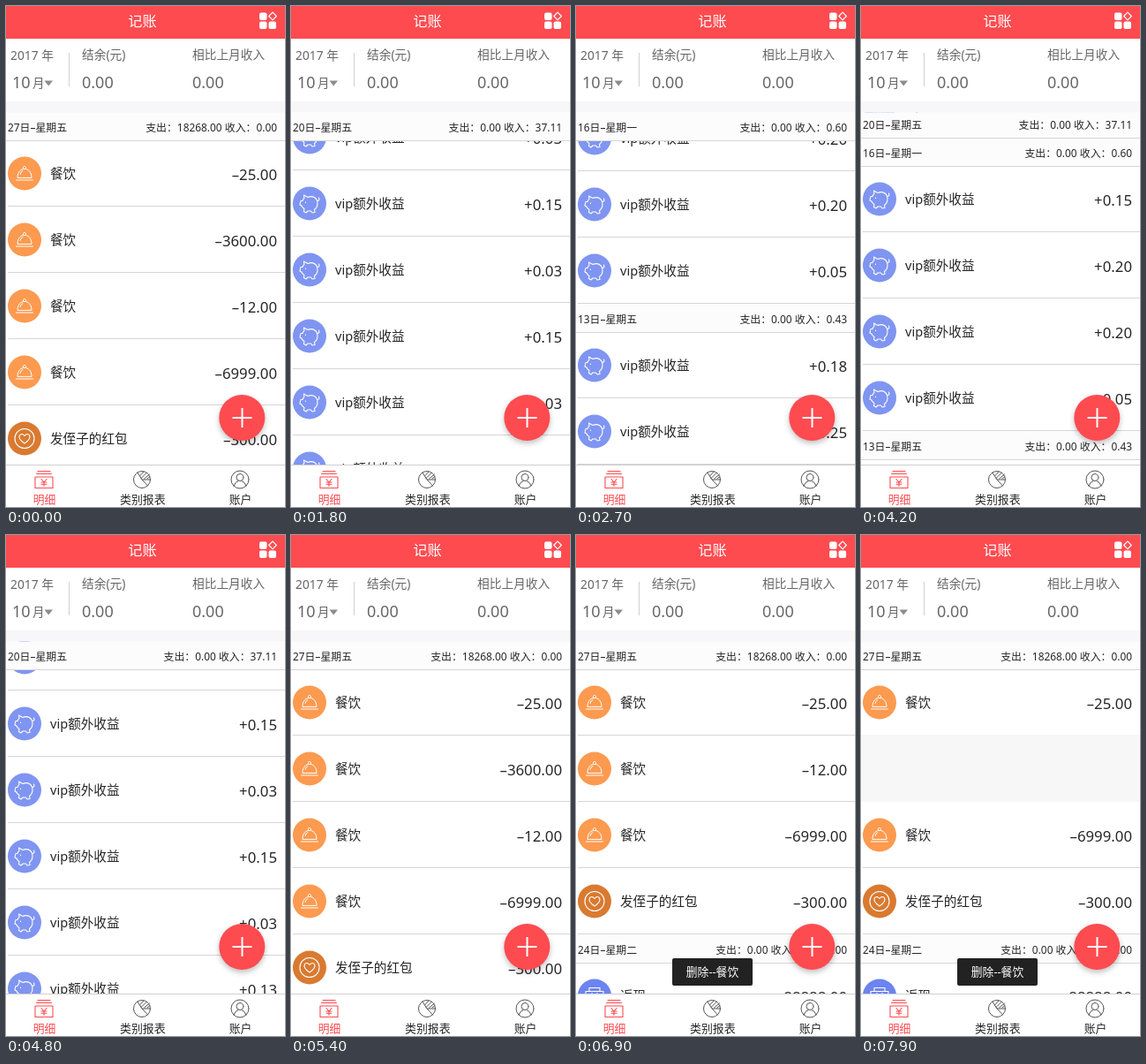
An HTML page with a canvas that plays this animation: 316x567 px, repeating every 8000 ms.

```html
<!DOCTYPE html>
<html lang="zh">
<head>
<meta charset="utf-8">
<style>
html, body { margin: 0; width: 100%; height: 100%; overflow: hidden; background: #fff; }
canvas { display: block; width: 316px; height: 567px; }
</style>
</head>
<body>
<canvas id="stage"></canvas>
<script>
const W = 316, H = 567, LOOP = 8000, STEP = 100;
const LIST_TOP = 120.5, LIST_END = 519, HEAD = 32, ROW = 75;
const RED = '#fe4b50', INK = '#262626', GREY = '#666', LINE = '#d6d6d6', GAP = '#f7f7f7';
const FONT = '"Noto Sans", "Noto Sans CJK SC", sans-serif';

const canvas = document.getElementById('stage');
const c = canvas.getContext('2d');
const dpr = window.devicePixelRatio || 1;
canvas.width = W * dpr;
canvas.height = H * dpr;

const meal = amount => ({ icon: cloche, color: '#fc9a50', label: '餐饮', amount });
const bonus = amount => ({ icon: pig, color: '#7f95f1', label: 'vip额外收益', amount });
const sections = [
  { date: '27日–星期五', out: '18268.00', income: '0.00', rows: [
    meal('–25.00'), meal('–3600.00'), meal('–12.00'), meal('–6999.00'),
    { icon: heart, color: '#d97a30', label: '发侄子的红包', amount: '–300.00' }] },
  { date: '24日–星期二', out: '0.00', income: '88888.00', rows: [
    { icon: cashback, color: '#6c84f0', label: '返现', amount: '+88888.00' }] },
  { date: '20日–星期五', out: '0.00', income: '37.11', rows:
    ['+36.26', '+0.03', '+0.15', '+0.03', '+0.15', '+0.03', '+0.13', '+0.15', '+0.03', '+0.15'].map(bonus) },
  { date: '16日–星期一', out: '0.00', income: '0.60', rows:
    ['+0.15', '+0.20', '+0.20', '+0.05'].map(bonus) },
  { date: '13日–星期五', out: '0.00', income: '0.43', rows: ['+0.18', '+0.25'].map(bonus) }
];

// Motion tracks: [time, value] pairs, linear between neighbours.
const scrollKeys = [[1600, 0], [1700, 270], [1800, 630], [1900, 815], [2000, 975], [2100, 1111],
  [2200, 1226], [2300, 1320], [2400, 1385], [2500, 1411], [4100, 1411], [4200, 1267], [4300, 1130],
  [4400, 1130], [4500, 930], [4700, 930], [4800, 640], [4900, 390], [5000, 200], [5100, 65], [5200, 0]];
sections[0].rows[1].swipe = [[5600, 0], [5700, 25], [5800, 75], [5900, 150], [6000, 225],
  [6100, 280], [6300, 280], [6400, W]];
sections[0].rows[1].collapse = [6500, 6900];
sections[0].rows[2].swipe = [[7200, 0], [7300, 70], [7400, 170], [7500, 270], [7800, 270], [7900, W]];

function track(keys, t) {
  if (t <= keys[0][0]) return keys[0][1];
  for (let i = 1; i < keys.length; i++) {
    const [t0, v0] = keys[i - 1], [t1, v1] = keys[i];
    if (t <= t1) return v0 + (v1 - v0) * (t - t0) / (t1 - t0);
  }
  return keys[keys.length - 1][1];
}

function rowHeight(row, t) {
  if (!row.collapse) return ROW;
  const [a, b] = row.collapse;
  const p = Math.min(1, Math.max(0, (t - a) / (b - a)));
  return ROW * (1 - p * p * (3 - 2 * p));
}

function box(x, y, w, h, color) {
  c.fillStyle = color;
  c.fillRect(x, y, w, h);
}

function roundBox(x, y, w, h, r, color) {
  c.fillStyle = color;
  c.beginPath();
  c.roundRect(x, y, w, h, r);
  c.fill();
}

function disc(x, y, r, color) {
  c.fillStyle = color;
  c.beginPath();
  c.arc(x, y, r, 0, Math.PI * 2);
  c.fill();
}

function text(str, x, y, size, color, align = 'left') {
  c.font = `${size}px ${FONT}`;
  c.fillStyle = color;
  c.textAlign = align;
  c.fillText(str, x, y + size * 0.36);
}

function stroke(path, x, y, color, width = 1) {
  c.save();
  c.translate(x, y);
  c.strokeStyle = color;
  c.lineWidth = width;
  c.lineCap = c.lineJoin = 'round';
  c.stroke(new Path2D(path));
  c.restore();
}

function cloche(x, y) {
  stroke('M-8 4.5C-8 -8.5 8 -8.5 8 4.5ZM-9.5 7.5H9.5M-1.5 -6a1.6 1.6 0 1 1 3 0M-5 1Q-4.5 -2 -2 -3', x, y, '#fff', 1);
}

function heart(x, y) {
  stroke('M11 0a11 11 0 1 1 -22 0a11 11 0 1 1 22 0M0 5.5C-11 -1.5 -4 -8.5 0 -3C4 -8.5 11 -1.5 0 5.5Z', x, y, '#fff', 1.1);
}

function pig(x, y) {
  stroke('M-6.5 -9.5L-2 -7C4 -9.5 9 -6 9 0C9 3.5 7.5 5.5 5.5 7L6 10L3 10.5L1.5 8.5H-2L-4 10.5L-6.5 9L-6 6Q-8.5 4.5 -9 2.5L-11 1.5L-10 -3L-8 -3Q-7.5 -5 -6 -6ZM8.5 -3Q12 -3 10.5 -6.5M-4.5 -1.5V-1', x, y, '#fff', 1.1);
}

function cashback(x, y) {
  stroke('M-10 -5H10V9H-10ZM-6 -5V-9H6V-5M-3 -3L0 1L3 -3M0 1V6M-3 1H3M-3 3.5H3', x, y, '#fff', 1.1);
}

function drawRow(row, y) {
  const mid = y + ROW / 2 - 0.5;
  box(0, y, W, ROW, '#fff');
  box(2, Math.floor(y + ROW - 1), W, 1, LINE);
  disc(21, mid, 19, row.color);
  row.icon(21, mid);
  text(row.label, 50, mid + 0.5, 14.6, INK);
  text(row.amount, 307, mid + 1, 16.8, INK, 'right');
}

function drawSwiped(row, y, h, shift) {
  const top = Math.floor(y - 1);
  box(0, top, W, y + h - top, GAP);
  if (shift >= W) return;
  c.save();
  c.translate(-shift, 0);
  drawRow(row, y);
  box(2, top, W, 1, LINE);
  c.restore();
}

function drawHead(s, y) {
  box(0, y, W, HEAD, '#fcfcfc');
  box(0, Math.ceil(y + HEAD - 1), W, 1, LINE);
  text(s.date, 2, y + 17, 11.9, INK);
  text(`支出：${s.out} 收入：${s.income}`, 307, y + 17, 11.9, INK, 'right');
}

function drawGlow(y, height) {
  if (height <= 0) return;
  c.fillStyle = 'rgba(90,90,90,.06)';
  c.beginPath();
  c.ellipse(W / 2, y, W * 0.6, height, 0, 0, Math.PI * 2);
  c.fill();
}

function drawList(t) {
  c.save();
  c.beginPath();
  c.rect(0, LIST_TOP, W, LIST_END - LIST_TOP);
  c.clip();
  let y = LIST_TOP - track(scrollKeys, t);
  const heads = [];
  for (const s of sections) {
    heads.push(y);
    const rowsTop = y + HEAD;
    y = rowsTop;
    for (const row of s.rows) {
      const h = rowHeight(row, t);
      const shift = row.swipe ? track(row.swipe, t) : 0;
      if (h > 0 && y < LIST_END && y + h > LIST_TOP) {
        if (shift > 0) drawSwiped(row, y, h, shift);
        else drawRow(row, y);
      }
      y += h;
    }
    drawHead(s, rowsTop - HEAD);
  }
  // The current day stays pinned until the next one pushes it out.
  const current = heads.filter(v => v <= LIST_TOP).length - 1;
  const next = current + 1 < heads.length ? heads[current + 1] : Infinity;
  drawHead(sections[current], Math.min(LIST_TOP, next - HEAD));
  drawGlow(LIST_END, track([[2400, 0], [2500, 40], [2700, 0]], t));
  drawGlow(LIST_TOP, track([[5100, 0], [5200, 16], [5400, 0]], t));
  c.restore();
}

function drawTop() {
  box(0, 0, W, 37, RED);
  text('记账', 154.5, 17, 16.2, '#fff', 'center');
  for (const [x, y] of [[287, 7.5], [287, 17.5], [297.5, 17.5]]) roundBox(x, y, 8.5, 8.5, 2, '#fff');
  stroke('M0 -4.3L4.3 0L0 4.3L-4.3 0Z', 302, 11.5, '#fff', 1.2);

  box(0, 37, W, 71, '#fff');
  box(0, 108, W, 13, '#f7f6f9');
  text('2017 年', 5, 56, 13.8, GREY);
  text('10', 7, 87, 18, GREY);
  text('月', 30, 87.5, 13.5, GREY);
  c.fillStyle = '#8c8c8c';
  c.fill(new Path2D('M43.5 84.5H53L48.2 90.5Z'));
  box(71, 53, 1, 38, '#d0d0d0');
  text('结余(元)', 86, 55.5, 13.7, GREY);
  text('相比上月收入', 211, 55.5, 13.7, GREY);
  text('0.00', 86, 87, 18, GREY);
  text('0.00', 211, 87, 18, GREY);
}

function drawTabs() {
  box(0, LIST_END, W, H - LIST_END, '#fff');
  box(0, LIST_END, W, 1, '#cfcfcf');
  stroke('M-7 -9.5H7M-8.5 -6.5H8.5M-10 -3H10V9.5H-10ZM-3 -.5L0 3L3 -.5M0 3V7.5M-3 3H3M-3 5.2H3', 43, 536, RED, 1.1);
  stroke('M9.5 0a9.5 9.5 0 1 1 -19 0a9.5 9.5 0 1 1 19 0M-5 -8L0 0H9.5M0 0L6.5 7M-2.5 -4L2 -9M-1 -1.5L5.5 -8M2.5 -1L8.5 -6M6 -1L9 -3.5', 154, 536, '#555', 1);
  stroke('M10 0a10 10 0 1 1 -20 0a10 10 0 1 1 20 0M4 -2.5a4 4 0 1 1 -8 0a4 4 0 1 1 8 0M-7 7Q-5.5 2.5 -2 1.5M7 7Q5.5 2.5 2 1.5', 265, 536, '#555', 1);
  text('明细', 43.5, 558, 12.8, RED, 'center');
  text('类别报表', 154.8, 558, 12.9, INK, 'center');
  text('账户', 265.5, 558, 12.8, INK, 'center');
}

function drawAddButton() {
  c.save();
  c.shadowColor = 'rgba(0,0,0,.25)';
  c.shadowBlur = 6 * dpr;
  c.shadowOffsetY = 3 * dpr;
  disc(267.3, 466, 26, RED);
  c.restore();
  box(256.5, 465, 22, 2, '#fff');
  box(266.5, 455, 2, 22, '#fff');
}

function drawToast() {
  roundBox(109, 479, 91, 31, 2, '#222');
  text('删除--餐饮', 154.5, 494.5, 12.8, '#fff', 'center');
}

function draw(now) {
  const t = Math.floor((now % LOOP) / STEP) * STEP;
  c.setTransform(dpr, 0, 0, dpr, 0, 0);
  box(0, 0, W, H, '#fff');
  drawTop();
  drawList(t);
  drawAddButton();
  drawTabs();
  if (t >= 6400) drawToast();
}

let start;
function tick(now) {
  start ??= now;
  draw(now - start);
  requestAnimationFrame(tick);
}
draw(0);
requestAnimationFrame(tick);
</script>
</body>
</html>
```
